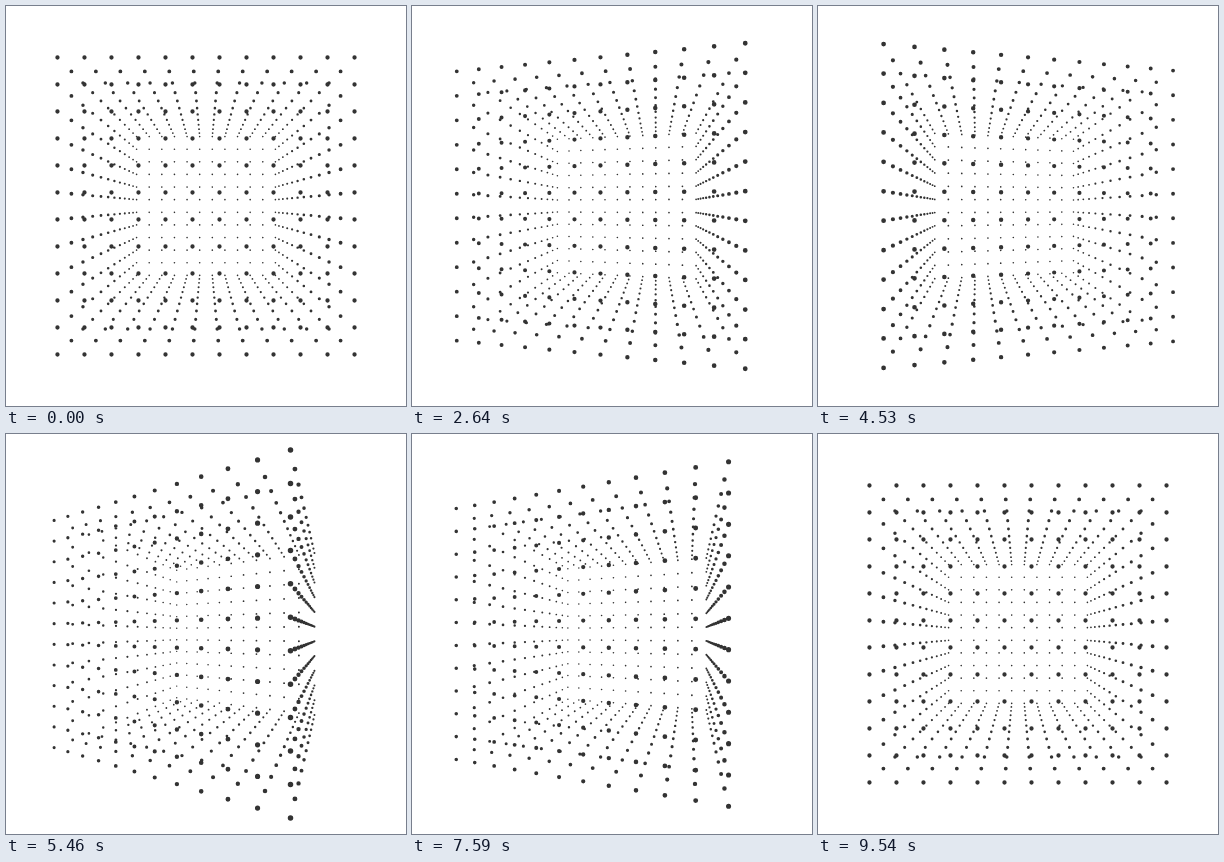
Write an HTML page with a canvas that moves like this. It is 400 px wide and 400 px high and loops after 9.57 s.

```html
<!DOCTYPE html>
<html>
<head>
<meta charset="utf-8">
<title>Rotating dot cube</title>
<style>
  html, body { margin: 0; width: 100%; height: 100%; overflow: hidden; background: #fff; }
  canvas { display: block; width: 400px; height: 400px; }
</style>
</head>
<body>
<canvas id="stage" width="400" height="400"></canvas>
<script>
const ctx = document.getElementById('stage').getContext('2d');
const SIZE = 400;
const LOOP = 9570;
const STEP = 30;
const TURN_STEPS = LOOP / STEP - 1;
const COUNT = 12;
const GAP = 66;
const CAMERA = 1000;
const FOCAL = SIZE / 2 / Math.tan(37.5 * Math.PI / 180);

const onEdge = n => n === 0 || n === COUNT - 1;
const place = n => (n - (COUNT - 1) / 2) * GAP;

// Points on the six faces of the cube
const points = [];
for (let i = 0; i < COUNT; i++) {
  for (let j = 0; j < COUNT; j++) {
    for (let k = 0; k < COUNT; k++) {
      if (onEdge(i) || onEdge(j) || onEdge(k)) {
        points.push({ x: place(i), y: place(j), z: place(k) });
      }
    }
  }
}

function draw(time) {
  const step = Math.floor((time % LOOP) / STEP);
  const angle = step / TURN_STEPS * Math.PI * 2;
  const cos = Math.cos(angle);
  const sin = Math.sin(angle);

  ctx.fillStyle = '#fff';
  ctx.fillRect(0, 0, SIZE, SIZE);
  ctx.fillStyle = '#333';
  ctx.beginPath();
  for (const p of points) {
    const depth = CAMERA - (p.z * cos + p.x * sin);
    const scale = FOCAL / depth;
    const x = SIZE / 2 + (p.x * cos - p.z * sin) * scale;
    const y = SIZE / 2 + p.y * scale;
    const r = 1600 / depth - 0.35;
    ctx.moveTo(x + r, y);
    ctx.arc(x, y, r, 0, Math.PI * 2);
  }
  ctx.fill();
}

const start = performance.now();
function tick() {
  draw(performance.now() - start);
  requestAnimationFrame(tick);
}
tick();
</script>
</body>
</html>
```
